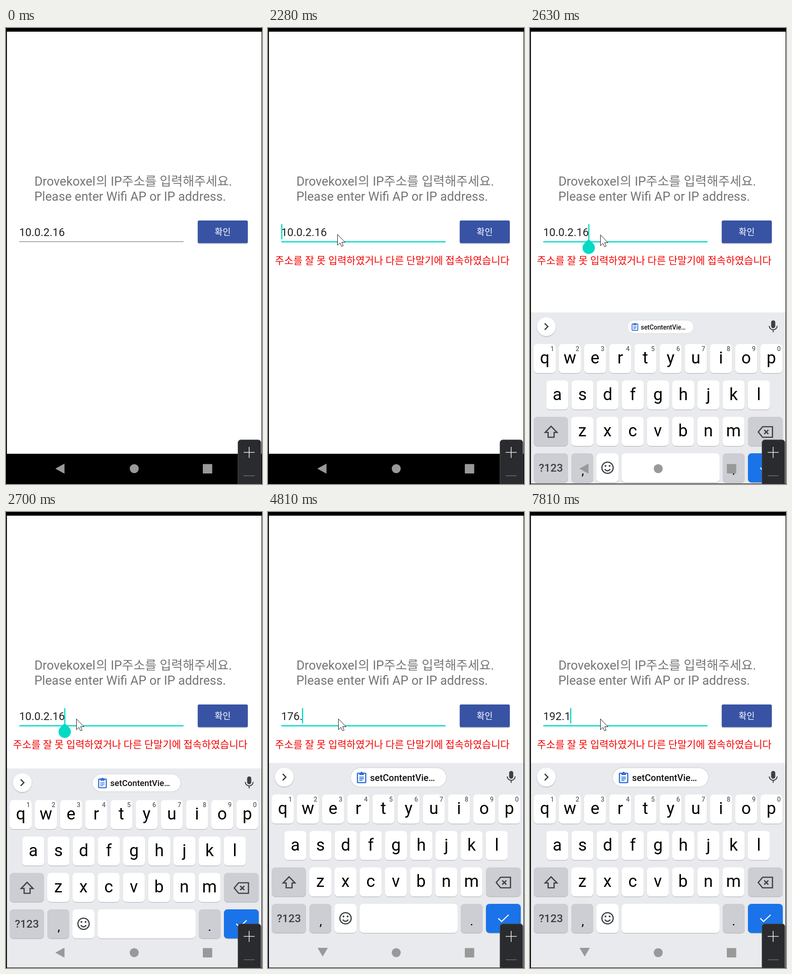
An HTML page that plays this animation: 558x995 px, repeating every 8000 ms.

```html
<!DOCTYPE html>
<html lang="ko">
<head>
<meta charset="utf-8">
<title>IP address form</title>
<style>
  html, body { margin: 0; width: 100%; height: 100%; overflow: hidden; background: #000; }
  svg { display: block; width: 100vw; height: 100vh; }
  text { font-family: Roboto, "Noto Sans CJK KR", "Noto Sans CJK", sans-serif; white-space: pre; }
  .mid { text-anchor: middle; }
  .line { fill: none; stroke: #3c4043; stroke-width: 2.6; }
</style>
</head>
<body>
<svg id="stage" viewBox="0 0 558 995" lang="ko">
  <defs>
    <clipPath id="screen"><rect x="2" y="8" width="555" height="986"/></clipPath>
    <clipPath id="buttonClip"><rect x="418" y="420" width="109" height="49.5" rx="3"/></clipPath>
    <filter id="soft" x="-20%" y="-20%" width="140%" height="150%">
      <feDropShadow dx="0" dy="1.2" stdDeviation="1.2" flood-opacity=".28"/>
    </filter>
  </defs>
  <rect width="558" height="995"/>
  <rect x="2" y="8" width="555" height="921" fill="#fff"/>

  <g font-size="27.2" fill="#757575">
    <text x="62" y="344">Drovekoxel</text>
    <text x="196.3" y="344" font-size="27.3">의 IP주소를 입력해주세요.</text>
    <text x="61.7" y="377">Please enter Wifi AP or IP address.</text>
  </g>

  <rect id="underline" x="29" width="358"/>
  <text id="hint" x="28.7" y="454" font-size="23.9" fill="#808080">Please enter the AP IP address.</text>
  <text id="value" x="28.7" y="454" font-size="23.9" fill="#212121"></text>
  <rect id="caret" y="428" width="2.6" height="33" fill="#03dac5"/>
  <path id="handle" fill="#03dac5" d="M128 460.5L137.5 470A13.5 13.5 0 1 1 118.5 470Z"/>

  <rect x="418" y="420" width="109" height="49.5" rx="3" fill="#3852a4" filter="url(#soft)"/>
  <circle id="ripple" cx="495" cy="423" fill="#fff" clip-path="url(#buttonClip)"/>
  <text class="mid" x="472.3" y="451.5" font-size="19" fill="#fff">확인</text>
  <text id="error" x="15.3" y="515" font-size="21.7" fill="#f50000">주소를 잘 못 입력하였거나 다른 단말기에 접속하였습니다</text>

  <g clip-path="url(#screen)"><g id="keyboard"></g></g>

  <g fill="#999">
    <path id="back"/>
    <circle cx="279.5" cy="961.5" r="9.8"/>
    <rect x="429" y="951.5" width="20.5" height="20.5" rx="1"/>
  </g>

  <rect x="505.7" y="898.7" width="50" height="105" rx="6" fill="#2a2b2f" stroke="#505154"/>
  <path d="M518 926H542M530 914V938" stroke="#e8e8e8" stroke-width="1.6"/>
  <path d="M518 977H542" stroke="#696a6d" stroke-width="1.6"/>

  <circle id="press" r="18" fill="#ff0" fill-opacity=".52"/>
  <path id="pointer" fill="#fff" stroke="#111" stroke-width="1"
        d="M.5 .5V24L6 19L9.5 26.5L13 25L9.7 17.5H17Z"/>
</svg>

<script>
const LOOP = 8000, STEP = 68.4;
const $ = id => document.getElementById(id);
const show = (id, on) => $(id).setAttribute('visibility', on ? 'visible' : 'hidden');
const set = (id, attrs) => { for (const k in attrs) $(id).setAttribute(k, attrs[k]); };
const clamp = v => Math.max(0, Math.min(1, v));
const part = (t, from, to) => clamp((t - from) / (to - from));
const easeOut = p => 1 - (1 - p) ** 3;
const smooth = p => p * p * (3 - 2 * p);
const within = (t, from, to) => t >= from && t < to;
const latest = (list, t) => list.filter(item => item[0] <= t).pop();

// Keyboard, laid out in its resting position
const PITCH = 54.9, ROW = 79.5, KEY_TOP = 616.5, GREY = '#ccced3';

function key(x, row, width = 48, fill = '#fff') {
  const y = KEY_TOP + row * ROW;
  const box = (dy, color) =>
    `<rect x="${x}" y="${y + dy}" width="${width}" height="63.5" rx="8" fill="${color}"/>`;
  return box(1.2, '#b3b6bb') + box(0, fill);
}

function label(text, x, y, size, extra = '') {
  return `<text class="mid" x="${x}" y="${y}" font-size="${size}" ${extra}>${text}</text>`;
}

function letters(text, x, row) {
  return [...text].map((c, i) => {
    const left = x + i * PITCH;
    const digit = row ? '' : label((i + 1) % 10, left + 40.5, 632, 14, 'fill="#5f6368" font-weight="500"');
    return key(left, row) + label(c, left + 24, 659 + row * ROW, 36.5) + digit;
  }).join('');
}

$('keyboard').innerHTML = `
  <rect x="2" y="547" width="555" height="2" fill="#f2f3f4"/>
  <rect x="2" y="548.5" width="555" height="460" fill="#e8eaed"/>
  <circle cx="35.5" cy="578.5" r="20.5" fill="#fff" filter="url(#soft)"/>
  <path class="line" d="M32 571.5L39 578.5L32 585.5"/>
  <g id="chip">
    <rect x="180" y="558" width="209" height="42" rx="21" fill="#fff" stroke="#d5d7da" stroke-width="1.4"/>
    <rect x="195" y="570" width="18" height="20.5" rx="1.5" fill="none" stroke="#2f6fd6" stroke-width="2.6"/>
    <path d="M199 569H209V574H199ZM202 567H206V570H202Z" fill="#2f6fd6"/>
    <path d="M199 578.5H209M199 582H209M199 585.5H206" stroke="#2f6fd6" stroke-width="1.8"/>
    <text x="222.5" y="587" font-size="20" font-weight="500" fill="#111">setContentVie…</text>
  </g>
  <rect x="525.6" y="565" width="9" height="17" rx="4.5" fill="#3c4043"/>
  <path class="line" style="stroke-width:2" d="M521.5 577A8.6 8.6 0 0 0 538.7 577M530 585.5V591"/>
  ${letters('qwertyuiop', 8, 0)}
  ${letters('asdfghjkl', 35.5, 1)}
  ${letters('zxcvbnm', 90, 2)}
  ${key(8, 2, 75, GREY)}${key(475, 2, 76, GREY)}
  <path class="line" d="M46 796L33 809.5H39.5V820H52.5V809.5H59Z"/>
  <path class="line" d="M507 797H528.5V820H507L497.5 808.5ZM510.5 804L519.5 813M519.5 804L510.5 813"/>
  ${key(8, 3, 75, GREY)}${key(90, 3, 48, GREY)}${key(145, 3)}${key(200, 3, 213)}
  ${key(420, 3, 48, GREY)}${key(475, 3, 76, '#1a73e8')}
  ${label('?123', 45.5, 895, 24, 'fill="#3c4043" font-weight="500"')}
  ${label(',', 115, 902, 28)}${label('.', 444, 902, 28)}
  <circle class="line" cx="169" cy="886.5" r="12.3"/>
  <path class="line" d="M163 889.5Q169 897 175 889.5"/>
  <circle cx="164.5" cy="882.5" r="2" fill="#3c4043"/><circle cx="173.5" cy="882.5" r="2" fill="#3c4043"/>
  <path d="M502 886.7L509 893.7L524.5 879" fill="none" stroke="#fff" stroke-width="2.4"/>`;

// time, field text, caret shown
const FULL = '10.0.2.16';
const edits = [
  [0, FULL, 0], [2350, FULL, 1], [2840, FULL, 0], [3110, '10.0.2.1', 1],
  [3580, '10.0.2.', 1], [3650, '10.0.', 1], [3720, '10.', 1], [3790, '1', 1], [3860, '', 1],
  [4060, '1', 1], [4280, '17', 1], [4410, '176', 1], [4810, '176.', 1], [5270, '176.', 0],
  [5540, '176', 1], [5740, '17', 1], [6200, '1', 1], [6330, '19', 1], [6530, '192', 1],
  [6800, '192.', 1], [7280, '192.', 0], [7740, '192.', 1], [7810, '192.1', 1]
];

// time, x, y of the pointer on its way to the button
const approach = [
  [380, 538, 782], [450, 530, 640], [520, 513, 477],
  [730, 510, 467], [780, 502, 444], [840, 494, 423]
];

function pointerAt(t) {
  if (t < 1450) return (latest(approach, t) || [0, 600, 1100]).slice(1);
  if (t >= 2420) return [153, 451];
  const p = smooth(part(t, 1450, 1790));
  return [494 - 343 * p, 423 + 27 * p];
}

function drawField(t) {
  const [, text, caretOn] = latest(edits, t);
  const focused = t >= 2210, atStart = within(t, 2210, 2350);
  $('value').textContent = text;
  show('hint', text === '');
  const end = text && !atStart ? 28.7 + $('value').getComputedTextLength() : 30;
  set('caret', { x: end - 1.3 });
  show('caret', caretOn || atStart);
  set('underline', focused
    ? { y: 465.2, height: 2.6, fill: '#03dac5' }
    : { y: 465.6, height: 1.3, fill: '#7d7d7d' });
  show('handle', within(t, 2350, 3250));
  set('handle', { opacity: 1 - part(t, 3060, 3250) });
}

function draw(t) {
  const frame = 1040 + Math.floor((t - 1037) / STEP) * STEP;
  drawField(t);

  const [x, y] = pointerAt(t < 1450 ? t : frame);
  set('pointer', { transform: `translate(${x} ${y})` });
  set('press', { cx: x, cy: y });
  show('press', within(t, 1038, 1180) || within(t, 2008, 2150));

  set('ripple', { r: 110 * easeOut(part(frame, 1060, 1330)), opacity: .22 * (1 - part(frame, 1250, 1450)) });
  show('error', t >= 1390);

  show('keyboard', t >= 2486);
  const rise = easeOut(part(frame, 2486, 2766));
  set('keyboard', { transform: `translate(0 ${Math.round(447 * (1 - rise))})` });
  const scale = .515 + .485 * part(frame, 2560, 2705);
  set('chip', { transform: `translate(284.5 579) scale(${scale}) translate(-284.5 -579)` });
  set('back', { d: t < 2840 ? 'M107.5 961.5L127.5 950.5V972.5Z' : 'M108 951H130.5L119.2 970Z' });
}

const start = performance.now();
function tick() {
  draw((performance.now() - start) % LOOP + 1);
  requestAnimationFrame(tick);
}
tick();
</script>
</body>
</html>
```
